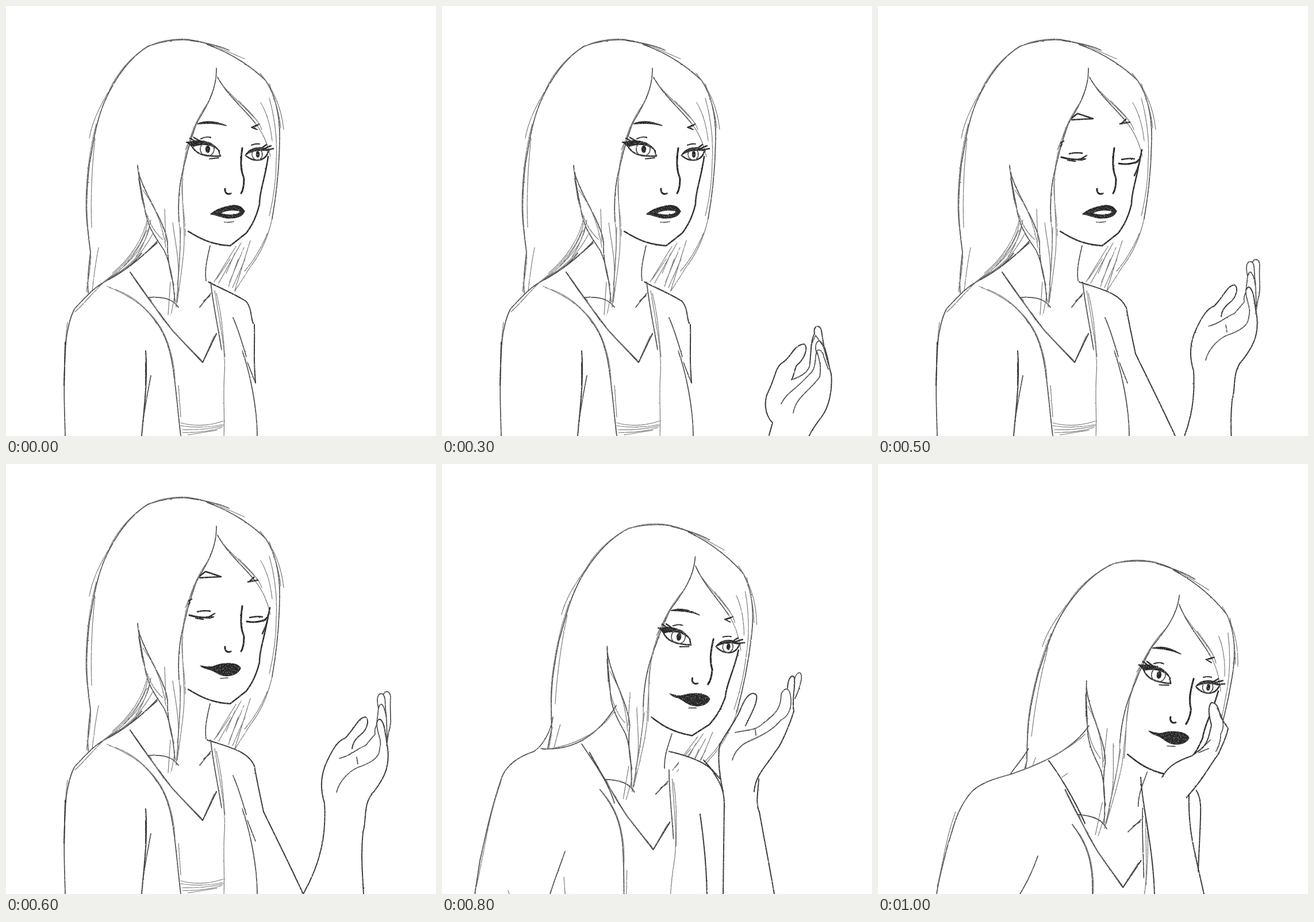
An HTML page that plays this animation: 748x748 px, repeating every 2000 ms.

```html
<!DOCTYPE html>
<html lang="en">
<head>
<meta charset="utf-8">
<title>Pencil sketch</title>
<style>
  html, body { margin: 0; width: 100%; height: 100%; overflow: hidden; background: #fff; }
  svg { display: block; width: 100vw; height: 100vh; }
  path, ellipse { fill: none; stroke: #484848; stroke-width: 1.7; stroke-linecap: round; stroke-linejoin: round; }
  .soft { stroke: #757575; stroke-width: 1.2; }
  .firm { stroke: #333; stroke-width: 2; }
  .bold { stroke: #292929; stroke-width: 2.5; }
  .heavy { stroke: #222; stroke-width: 3; }
  .ink { fill: #262626; stroke: #262626; stroke-width: 1.4; }
  .paper { fill: #fff; }
  .cover { fill: #fff; stroke: none; }
</style>
</head>
<body>
<svg viewBox="0 0 748 748">
<filter id="pencil" filterUnits="userSpaceOnUse" x="0" y="0" width="748" height="748" color-interpolation-filters="sRGB">
  <feTurbulence type="fractalNoise" baseFrequency=".2" numOctaves="2" seed="4" result="wobble"/>
  <feDisplacementMap in="SourceGraphic" in2="wobble" scale="1.8" xChannelSelector="R" yChannelSelector="G" result="lines"/>
  <feTurbulence type="fractalNoise" baseFrequency=".5" seed="9"/>
  <feColorMatrix values="0 0 0 0 0  0 0 0 0 0  0 0 0 0 0  1.6 0 0 0 .2"/>
  <feComposite in="lines" operator="in"/>
</filter>
<g filter="url(#pencil)">
  <g id="head">
    <!-- hair -->
    <path d="M362 71C330 55 290 55 247 70C215 90 190 125 172 165C155 205 152 240 145 275C138 340 139 370 147 428C144 455 141 480 143 499"/>
    <path class="soft" d="M320 58C290 55 262 62 247 71M240 74C205 100 185 130 175 158M180 146C160 180 149 205 145 230M157 205C141 265 135 340 142 390M155 230C149 280 147 340 149 385M147 428C149 460 141 480 140 497M161 420C155 450 153 470 150 495"/>
    <path d="M320 60C350 64 375 71 388 77M350 67C395 83 430 108 452 130C470 158 477 195 476 235C475 290 470 330 463 370"/>
    <path class="soft" d="M360 68L415 92M442 117C470 150 480 185 483 215M458 135C470 170 476 190 478 212M443 168C453 185 460 205 463 235M458 160C469 200 472 240 470 270C470 310 464 340 458 365"/>
    <path d="M366 108C367 150 345 180 331 205C321 235 317 245 313 265C303 300 298 330 301 375"/>
    <path class="soft" d="M350 170C325 205 316 240 310 270C304 300 308 340 309 380C313 420 305 460 298 515M301 375C306 410 301 460 296 522M310 280C300 320 312 360 312 400M330 208L312 250"/>
    <path d="M368 124C385 155 415 180 433 203"/>
    <path class="soft" d="M376 137C400 165 418 178 437 200M433 203C447 220 455 240 460 262M405 165C425 185 440 200 445 215"/>
    <path d="M229 277C231 300 236 325 241 350C245 385 262 405 275 425C287 450 292 490 294 515M229 280C234 320 275 370 281 410C280 440 287 470 292 485M231 300L237 338"/>
    <path class="soft" d="M238 320C260 350 272 380 278 420M236 335C245 370 255 390 272 406M276 353L278 410M290 377C294 410 304 450 298 485M304 385C303 430 300 460 299 495M286 480L282 537M294 500L287 538M300 490L296 524"/>
    <!-- neck and top -->
    <path d="M355 417C350 440 345 457 348 478M246 507C275 505 290 510 300 524M337 524L356 500M344 513L355 504"/>
    <path class="firm" d="M216 463C235 490 262 530 290 565L342 620L366 570"/>
    <path class="soft" d="M220 470C240 500 255 520 270 537M250 508C272 552 305 580 340 616M345 612L362 574M366 500C376 540 377 570 381 610"/>
    <path d="M356 480C360 520 371 570 375 598M240 525C270 555 281 580 288 615C296 660 298 700 304 748"/>
    <path class="soft" d="M363 495C370 540 383 600 380 640C377 680 381 710 379 748M244 529C280 560 292 610 294 650M300 660L304 715"/>
    <path class="soft" d="M304 725Q340 735 378 722M304 730Q340 736 378 728M306 737Q350 738 378 730M307 742Q350 742 376 733M317 746L367 738"/>
    <!-- face -->
    <path class="bold" d="M456 262C451 300 440 325 441 345C434 372 426 384 418 395L390 417C355 415 335 403 317 392"/>
    <path class="heavy" d="M411 247C407 275 409 288 414 300C414 314 412 321 409 326M381 318C380 325 386 329 391 326"/>
  </g>
  <g id="hatch">
    <path class="soft" d="M247 365C240 405 215 440 185 465M246 378C240 412 212 448 170 480M250 383C244 420 205 458 160 488M256 395C235 435 210 457 180 473M245 390C232 420 222 435 205 452M252 372C246 400 238 420 226 436"/>
    <path d="M263 412C235 437 208 460 178 476M236 430C220 450 200 464 182 473"/>
  </g>
  <g id="rightHair">
    <path class="soft" d="M463 370C455 405 440 435 424 455C415 470 405 485 398 496M455 395C440 430 425 450 415 461M400 418L362 480M409 412L370 482M398 430L383 465M425 408L398 495M414 420L389 480M404 440L387 488M416 440L394 490M390 440L366 475"/>
  </g>
  <g id="awake">
    <path class="ink" d="M333 205C347 199 365 200 383 208C365 203 350 204 333 205ZM427 211Q435 207 441 205Q436 210 427 211Z"/>
    <path class="bold" style="stroke-width:2" d="M427 211L437 215M339 231Q350 226 356 229M427 242Q435 239 441 240M354 266L370 264"/>
    <path class="ink" d="M316 238C332 231 358 233 371 252C358 239 340 239 324 245ZM416 260C425 244 446 243 458 252C446 250 428 250 416 260Z"/>
    <path class="bold" d="M370 251L373 261C345 262 330 258 323 243M418 261C430 271 450 272 456 254M326 238L314 237M331 236L320 230M338 235L327 229M447 249L461 243M451 251L465 248M444 248L453 241"/>
    <ellipse cx="350" cy="249" rx="12" ry="12"/><ellipse cx="437" cy="258" rx="9" ry="10"/>
    <ellipse class="ink" cx="351" cy="249" rx="3.5" ry="6"/><ellipse class="ink" cx="438" cy="258" rx="2.5" ry="5"/>
  </g>
  <g id="asleep">
    <path class="bold" d="M337 195L347 187L374 196L337 198M421 205L438 202M424 204L431 197M318 238L323 235M318 244L320 240M459 250L454 276L446 295"/>
    <path class="heavy" d="M319 263C335 268 350 268 357 265M419 274Q435 277 451 271"/>
    <path class="bold" d="M333 257Q345 254 355 256M330 268L343 270M350 268L363 260M353 268L361 266M424 267Q438 264 446 266M448 273L454 267"/>
  </g>
  <g id="parted">
    <path class="ink" fill-rule="evenodd" d="M356 362C370 350 385 349 392 347C405 345 411 350 415 357C412 366 400 370 385 369C375 368 366 363 356 362ZM372 361C382 354 398 354 408 357C405 364 390 365 372 361Z"/>
    <path d="M380 376Q388 377 396 375"/>
  </g>
  <g id="smile">
    <path class="ink" d="M338 351C350 354 358 354 364 351C372 348 380 347 384 347C395 346 405 349 408 355C404 366 390 370 378 368C366 365 360 358 352 357C347 356 342 354 338 351Z"/>
    <path d="M373 373L386 372"/>
  </g>

  <!-- bodies -->
  <g id="seated">
    <path d="M264 408C235 440 205 462 175 478C155 487 135 510 119 527C105 555 103 590 102 630C100 670 102 710 103 748"/>
    <path class="soft" d="M185 470C160 485 140 515 120 532M107 550C100 600 103 640 101 660M175 487C200 498 225 510 245 530M180 490C220 500 250 530 262 553"/>
    <path class="firm" d="M103 585L101 660M243 600C247 650 240 700 236 748M243 620L243 665"/>
    <path d="M252 643C245 680 239 710 237 735M395 542C405 565 412 590 418 610M411 600C425 640 437 700 437 748M420 620L434 656"/>
  </g>
  <g id="armDown"><path class="firm" d="M352 480C375 492 400 502 418 514C428 527 425 540 430 552M432 554C433 600 430 610 434 655"/></g>
  <g id="armOut"><path class="firm" d="M352 480C375 492 400 502 418 514C428 540 430 565 437 590C450 640 470 690 490 748"/></g>
  <g id="armBent"><path class="firm" d="M350 480C385 492 420 498 432 525C438 560 443 580 448 605C470 650 495 700 517 748"/></g>
  <g id="leaning">
    <path class="cover" d="M170 495L228 503L240 530L200 600L100 600ZM410 505L447 525L440 560L412 560Z"/>
    <path d="M172 490C150 505 130 520 120 540C108 580 105 620 103 660C98 690 99 720 98 748M165 498C190 499 210 504 228 503C260 490 280 470 295 448"/>
    <path class="soft" d="M175 494C215 506 240 498 268 480M104 600L99 680M217 525C245 535 270 560 285 580M221 698L220 748M228 698L226 748"/>
    <path class="firm" d="M385 488C405 505 435 515 447 525C480 560 475 600 490 630C505 670 520 685 532 698M421 583C435 605 440 630 443 650C452 680 452 715 454 748"/>
  </g>
  <g id="lowered">
    <path class="cover" d="M160 500L178 496L243 487L260 520L150 560ZM412 504L450 516L472 534L470 580L412 580Z"/>
    <path d="M193 440C190 465 175 490 160 500C130 510 112 525 104 545C85 600 75 650 66 690L57 748M172 495C225 500 270 475 303 420M214 674C205 700 195 725 188 748M243 487C265 520 290 555 300 590"/>
    <path class="soft" d="M175 497C240 490 280 460 300 430M103 552C82 610 78 650 60 735M212 718L214 748M115 742L117 748"/>
    <path class="firm" d="M395 500C430 508 460 520 470 533C480 550 490 560 491 590L489 748M449 609C455 650 460 700 461 748M455 515L483 547"/>
  </g>
  <g id="resting">
    <path class="cover" d="M230 540L262 528L300 514L330 560L280 620L220 600Z"/>
    <path d="M262 495C250 515 240 525 230 540C290 520 340 495 367 455M230 540C200 548 180 555 165 568C135 600 130 640 122 660C112 700 105 725 102 748M278 682C270 705 258 730 247 748"/>
    <path class="soft" d="M240 536C300 515 340 490 360 470M135 605C118 650 112 700 103 735M320 545L330 538"/>
    <path class="firm" d="M297 516C315 540 340 580 360 625M457 545C460 600 478 660 481 748"/>
  </g>

  <!-- hands -->
  <g id="fist">
    <path class="firm" d="M567 670C572 700 560 720 566 728C575 740 580 744 586 748M567 667L582 653L594 660L588 668Q590 680 601 678M604 682C600 665 610 650 612 638L637 623L643 630L645 645C665 655 675 670 684 690C688 705 684 720 687 730L680 748"/>
    <path d="M645 645C630 655 612 680 614 690C606 700 605 710 610 715M650 660C640 675 618 690 616 710C612 725 617 728 622 728M663 670C645 690 628 710 622 728C630 740 650 730 676 711M580 675L598 690M595 675L606 685M603 683L583 697M595 665Q605 667 602 678"/>
  </g>
  <g id="cupped">
    <path class="firm" d="M545 748C558 720 565 690 575 655C560 640 560 615 568 600C580 575 580 560 590 552C610 540 610 520 630 518C638 525 630 545 617 555C612 565 612 575 608 580M640 552C642 530 642 510 648 500C645 485 658 483 660 495L664 520C672 540 672 555 677 570C680 600 672 630 660 645C645 665 635 680 636 690C632 715 632 735 629 748"/>
    <path d="M608 580C625 575 640 565 640 552M642 520L650 503L662 520M652 535C646 517 655 508 660 515C668 530 668 545 673 555M652 530C656 526 663 530 664 540L672 562M652 530C658 550 660 560 657 575C640 600 615 610 611 638M590 622C598 605 610 600 625 585L640 570C652 560 648 540 652 530"/>
  </g>
  <g id="raised">
    <path class="firm" d="M517 748C550 690 557 640 554 590C548 570 546 550 555 525C570 490 580 480 590 477C610 455 612 442 625 440C633 445 628 462 618 470C605 480 603 488 602 495M645 450C650 435 658 450 660 470L664 495C668 530 655 550 640 570C620 590 628 620 621 640C617 680 620 710 622 748"/>
    <path d="M580 512C600 508 610 495 625 490L642 470C640 455 645 460 645 450L648 425C643 405 648 398 655 400C662 405 658 420 662 440M657 400C660 393 668 395 669 405C667 430 672 450 666 465L662 490M648 425C652 410 659 420 662 445L663 478M575 571C580 550 600 530 620 525C645 515 650 505 650 495C655 480 645 470 645 450M610 510L612 522"/>
  </g>
  <g id="open">
    <path class="firm" d="M528 748C530 735 530 715 533 700C538 680 542 640 540 600C545 550 530 505 533 487C555 450 575 430 590 403C605 380 615 385 614 400C608 420 595 435 585 448M661 365C665 385 660 395 662 415C658 450 640 470 645 475C630 500 610 515 604 530C604 545 606 600 606 620C612 660 615 700 619 748"/>
    <path d="M561 460C590 452 605 450 620 440C640 430 638 415 640 390C645 372 655 375 657 390C652 410 650 425 638 435C620 462 595 470 580 478C565 490 558 500 556 514M652 375C650 355 660 350 661 365M656 355C665 340 675 345 672 360C670 385 667 395 662 405M546 660L530 740"/>
  </g>
  <g id="near">
    <path class="firm" d="M489 570C480 530 480 500 484 487C495 465 510 450 520 425C530 400 540 395 547 402C550 415 535 440 528 455M601 390C602 370 610 365 613 372C615 390 608 410 612 430C606 450 590 490 580 500C565 525 545 540 543 570M551 548C550 570 545 590 552 605C560 650 568 690 578 748"/>
    <path d="M510 467C530 462 545 465 560 450C580 435 590 425 590 400C598 385 606 390 607 410C608 425 602 440 590 445C570 470 540 478 525 487C512 497 508 505 505 515M545 462L546 472M613 375C618 358 627 360 625 375C622 390 618 400 614 408"/>
  </g>
  <g id="cheek">
    <path class="firm paper" d="M494 545C505 525 520 517 545 508C565 495 570 490 575 475L580 455C577 440 572 425 580 415C590 415 592 425 596 440L609 460C605 480 597 492 592 505C580 520 570 540 552 562L537 580"/>
    <path d="M575 495L558 502M578 480L560 498M590 425C600 440 605 455 596 470C597 485 590 495 588 500"/>
    <path class="firm" d="M541 575C540 620 545 650 552 680C557 705 562 725 567 748M553 567C563 580 562 600 560 640L557 708"/>
  </g>
</g>
</svg>
<script>
const still = 'hatch rightHair awake parted seated armDown';
const headParts = ['head', 'hatch', 'rightHair', 'awake', 'asleep', 'parted'];
const groups = [...document.querySelectorAll('g[id]')];

// parts shown, head lean [turn, x, y], offset of the named parts [x, y]
const poses = [
  { parts: still },
  { parts: still + ' fist', offset: [0, 70], moved: 'fist' },
  { parts: still + ' fist' },
  { parts: still + ' cupped', offset: [0, 70], moved: 'cupped' },
  { parts: 'hatch rightHair awake parted seated armOut cupped' },
  { parts: 'hatch rightHair asleep parted seated armBent raised', offset: [-5, 45], moved: 'raised' },
  { parts: 'hatch rightHair asleep smile seated armBent raised' },
  { parts: 'hatch rightHair awake smile leaning open', lean: [.04, 49, 25] },
  { parts: 'rightHair awake smile lowered near', lean: [.096, 85, 18] },
  { parts: 'rightHair awake smile lowered near', lean: [.12, 130, 42], offset: [34, 31], moved: 'lowered near' },
  { parts: 'awake smile resting cheek', lean: [.145, 174, 67] }
];

const leaning = (turn, x, y) => `matrix(1 ${turn} ${-turn} 1 ${x} ${y})`;

function transformOf(id, [turn, x, y], offset, moved) {
  if (headParts.includes(id)) return leaning(turn, x, y);
  // the smile tilts less than the head
  if (id === 'smile') return leaning(turn * .8, x, y + turn * 50);
  return `translate(${moved.split(' ').includes(id) ? offset : [0, 0]})`;
}

function show({ parts, lean = [0, 0, 0], offset = [0, 0], moved = '' }) {
  const visible = ['head', ...parts.split(' ')];
  for (const group of groups) {
    group.style.display = visible.includes(group.id) ? '' : 'none';
    group.setAttribute('transform', transformOf(group.id, lean, offset, moved));
  }
}

let current = -1;
function tick() {
  const index = Math.min(poses.length - 1, Math.floor(performance.now() % 2000 / 100));
  if (index !== current) show(poses[current = index]);
  requestAnimationFrame(tick);
}
tick();
</script>
</body>
</html>
```
